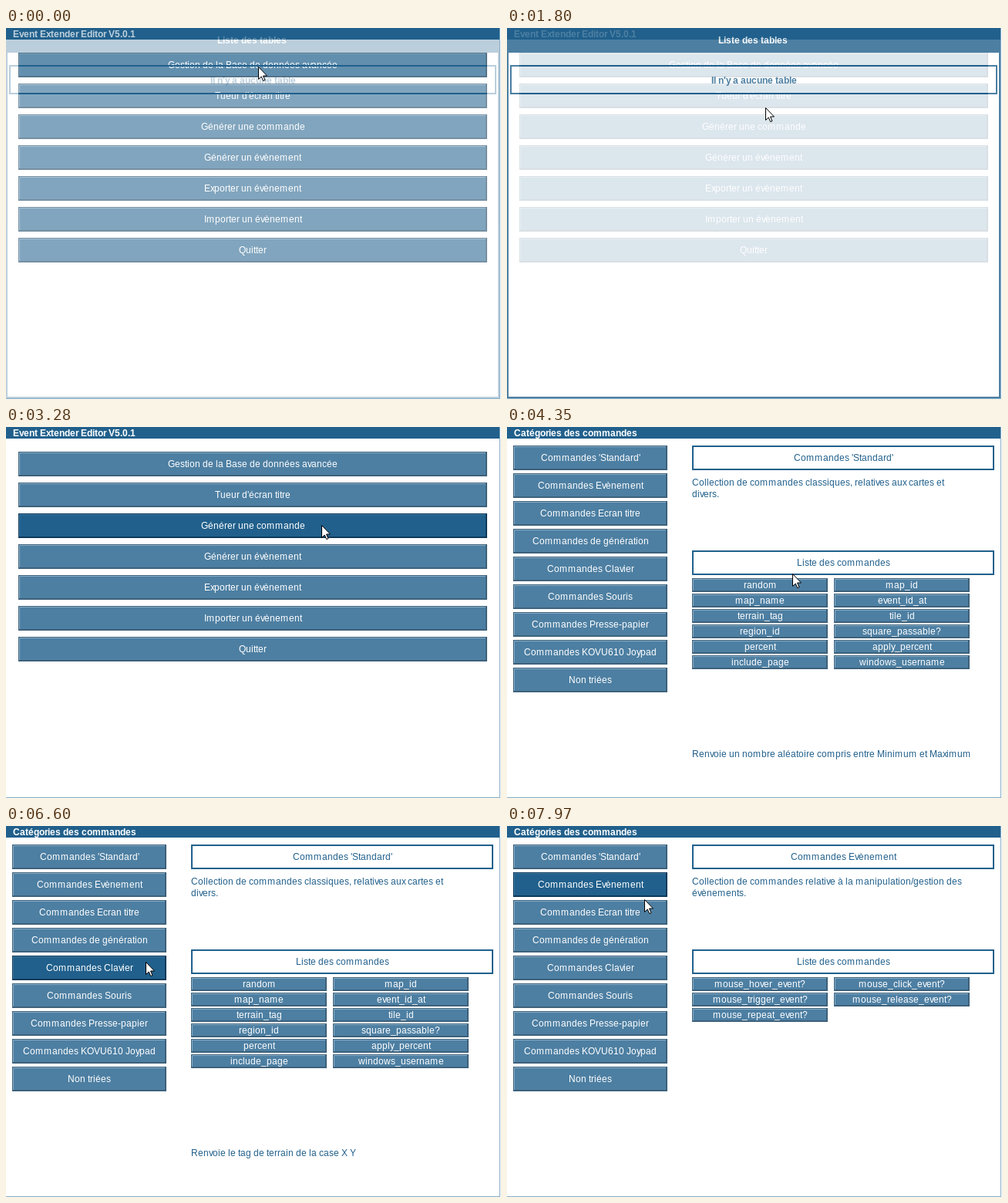
Animation of 642 by 481 pixels, one loop 8 s. Source, as an HTML page:

```html
<!DOCTYPE html>
<html lang="fr">
<head>
<meta charset="utf-8">
<title>Catégories des commandes</title>
<style>
  html, body { margin: 0; width: 100%; height: 100%; overflow: hidden; background: #fff; }
  svg { display: block; width: 642px; height: 481px; }
  text { font: 12px "Liberation Sans", Arial, sans-serif; fill: #21608c; }
  .bold { font-weight: bold; }
  .white { fill: #fff; }
  .blue { fill: #21608c; }
  .box { fill: #fff; stroke: #21608c; stroke-width: 2; }
  .hollow { fill: none; }
  .face { opacity: .8; }
  .hot .face { opacity: 1; }
  .dark { fill: #0d3a5b; }
  .light { fill: none; stroke: #6c9aba; }
  .hot .light { stroke: #3f789f; }
  .edge { fill: #86aeca; }
</style>
</head>
<body>
<svg id="stage" viewBox="0 0 642 481"></svg>
<script>
const stage = document.getElementById('stage');
const pen = document.createElement('canvas').getContext('2d');

// Whole-pixel glyph advances, with the few that do not round to the nearest pixel
const odd = { normal: { m: 11, v: 5, x: 5, y: 5 }, bold: { r: 4, v: 6, x: 6, y: 6 } };

function advance(ch, weight) {
  pen.font = `${weight} 1000px "Liberation Sans", Arial, sans-serif`;
  return odd[weight][ch] ?? Math.round(pen.measureText(ch).width * 0.012);
}

function add(parent, tag, attrs = {}) {
  const el = document.createElementNS('http://www.w3.org/2000/svg', tag);
  for (const k in attrs) el.setAttribute(k, attrs[k]);
  return parent.appendChild(el);
}

const group = (parent, cls = '') => add(parent, 'g', { class: cls });
const rect = (parent, x, y, width, height, cls) =>
  add(parent, 'rect', { x, y, width, height, class: cls });

function text(parent, str, x, y, cls = '') {
  const weight = cls.includes('bold') ? 'bold' : 'normal';
  const xs = [];
  for (const ch of str) {
    xs.push(x);
    x += advance(ch, weight);
  }
  const el = add(parent, 'text', { x: xs.join(' '), y, class: cls });
  el.textContent = str;
  return el;
}

function centered(parent, str, cx, y, cls = '') {
  const weight = cls.includes('bold') ? 'bold' : 'normal';
  const width = [...str].reduce((sum, ch) => sum + advance(ch, weight), 0);
  return text(parent, str, Math.round(cx - width / 2), y, cls);
}

function button(parent, label, x, y, w, h) {
  const el = group(parent);
  const face = group(el, 'face');
  rect(face, x, y, w, h, 'dark');
  rect(face, x + 1, y + 1, w - 3, h - 3, 'blue');
  add(face, 'path', { d: `M${x + 1.5} ${y + h - 2}V${y + 1.5}H${x + w - 2}`, class: 'light' });
  centered(el, label, x + w / 2, y + h / 2 + 4, 'white');
  return { el, x, y, w, h };
}

function frameBox(parent, label, y) {
  rect(parent, 241, y + 1, 390, 30, 'box');
  if (label) centered(parent, label, 436, y + 20);
}

const commandGrid = (parent, names) => names.map((name, i) =>
  button(parent, name, i % 2 ? 424 : 240, 196 + 20 * (i >> 1), 176, 18));

// Window
rect(stage, 0, 0, 640, 15, 'blue');
rect(stage, 640, 0, 1, 481, 'edge');
rect(stage, 0, 480, 641, 1, 'edge');

// Main menu
const menu = group(stage);
const menuButtons = [
  'Gestion de la Base de données avancée', "Tueur d'écran titre", 'Générer une commande',
  'Générer un évènement', 'Exporter un évènement', 'Importer un évènement', 'Quitter'
].map((label, i) => button(menu, label, 16, 32 + 40 * i, 608, 32));

// Table list
const tables = group(stage);
rect(tables, 1, 1, 638, 478, 'box hollow');
rect(tables, 0, 0, 640, 32, 'blue');
rect(tables, 5, 49, 630, 36, 'box hollow');
centered(tables, 'Liste des tables', 319, 20, 'white bold');
centered(tables, "Il n'y a aucune table", 320, 72, 'bold');
const overlap = group(stage);
for (const y of [48, 84]) rect(overlap, 16, y, 608, 2, 'blue');

// Command categories
const cats = group(stage);
const catButtons = [
  "Commandes 'Standard'", 'Commandes Evènement', 'Commandes Ecran titre',
  'Commandes de génération', 'Commandes Clavier', 'Commandes Souris',
  'Commandes Presse-papier', 'Commandes KOVU610 Joypad', 'Non triées'
].map((label, i) => button(cats, label, 8, 24 + 36 * i, 200, 32));
frameBox(cats, '', 24);
frameBox(cats, 'Liste des commandes', 160);

const standard = group(cats);
centered(standard, "Commandes 'Standard'", 436, 44);
text(standard, 'Collection de commandes classiques, relatives aux cartes et', 240, 76);
text(standard, 'divers.', 240, 91);
const stdButtons = commandGrid(standard, [
  'random', 'map_id', 'map_name', 'event_id_at', 'terrain_tag', 'tile_id',
  'region_id', 'square_passable?', 'percent', 'apply_percent',
  'include_page', 'windows_username'
]);
const notes = [
  'Renvoie un nombre aléatoire compris entre Minimum et Maximum',
  "Renvoie l'ID du tile de la case X Y, en fonction de la couche",
  'Renvoie le tag de terrain de la case X Y'
].map(str => text(standard, str, 240, 428));

const events = group(cats);
centered(events, 'Commandes Evènement', 436, 44);
text(events, 'Collection de commandes relative à la manipulation/gestion des', 240, 76);
text(events, 'évènements.', 240, 91);
commandGrid(events, [
  'mouse_hover_event?', 'mouse_click_event?', 'mouse_trigger_event?',
  'mouse_release_event?', 'mouse_repeat_event?'
]);

const menuTitle = text(stage, 'Event Extender Editor V5.0.1', 9, 12, 'white bold');
const catsTitle = text(stage, 'Catégories des commandes', 9, 12, 'white bold');
const cursor = add(stage, 'path', {
  d: 'M.5 .5V16.5L4.2 13 6.8 18.6 9 17.6 6.5 12H11.5Z', fill: '#fff', stroke: '#000'
});

// Bursts of screen refreshes: start, end, count
const bursts = [
  [120, 1110, 7], [1230, 2190, 8], [2340, 3280, 8], [3530, 4500, 8],
  [4620, 5550, 8], [5700, 6600, 8], [6750, 7120, 4], [7420, 7970, 5]
];

// Pointer path: time, x, y
const path = [
  [0, 327, 50], [450, 327, 50], [1110, 331, 80], [1500, 335, 103], [1790, 335, 103],
  [2190, 345, 68], [2340, 350, 57], [2620, 362, 88], [2950, 388, 122], [3120, 402, 136],
  [3280, 409, 127], [3670, 409, 127], [4220, 370, 190], [4370, 370, 190], [4500, 372, 199],
  [4750, 385, 222], [5020, 432, 226], [5300, 500, 238], [5550, 538, 244], [5700, 540, 241],
  [5960, 440, 248], [6210, 325, 244], [6470, 192, 200], [6600, 181, 176], [7120, 178, 84],
  [7830, 178, 86], [7970, 178, 95]
];

function refreshTime(t) {
  let last = 0;
  for (const [start, end, count] of bursts) {
    if (t < start) break;
    const step = (end - start) / (count - 1);
    last = start + step * Math.min(count - 1, Math.floor((t - start) / step + 1e-6));
  }
  return last;
}

function pointerAt(t) {
  const i = path.findIndex(p => p[0] > t);
  if (i < 0) return path[path.length - 1].slice(1);
  const [a, b] = [path[i - 1], path[i]];
  const k = (t - a[0]) / (b[0] - a[0]);
  return [1, 2].map(n => Math.round(a[n] + (b[n] - a[n]) * k));
}

const clamp = v => Math.max(0, Math.min(1, v));
const show = (el, on) => el.setAttribute('opacity', +on);
const hit = (list, x, y) => list.find(b =>
  x >= b.x && x < b.x + b.w && y >= b.y && y < b.y + b.h + (b.h > 20 ? 4 : 0));

function hovered(t, x, y) {
  if (t < 1100) return menuButtons[0];
  if (t < 2190) return null;
  if (t < 3500) return hit(menuButtons, x, y);
  if (t < 4000) return menuButtons[2];
  return hit(t < 7420 ? catButtons.concat(stdButtons) : catButtons, x, y);
}

const allButtons = [...menuButtons, ...catButtons, ...stdButtons];

function draw(t) {
  const tablesIn = t < 1200 ? clamp(0.3 + t / 513) : clamp((2190 - t) / 513);
  const catsIn = clamp((t - 3400) / 513);
  const menuIn = 1 - tablesIn - catsIn;
  show(menu, menuIn);
  show(menuTitle, menuIn);
  show(tables, tablesIn);
  show(overlap, tablesIn > 0);
  show(cats, catsIn);
  show(catsTitle, catsIn);
  show(standard, t < 7420);
  show(events, t >= 7420);
  const note = t < 5400 ? 0 : t < 6050 ? 1 : 2;
  notes.forEach((el, i) => show(el, i === note));

  const [x, y] = pointerAt(t);
  cursor.setAttribute('transform', `translate(${x} ${y})`);
  const hot = hovered(t, x, y);
  for (const b of allButtons) b.el.classList.toggle('hot', b === hot);
}

const began = performance.now();
function tick() {
  draw(refreshTime((performance.now() - began) % 8000));
  requestAnimationFrame(tick);
}
tick();
</script>
</body>
</html>
```
